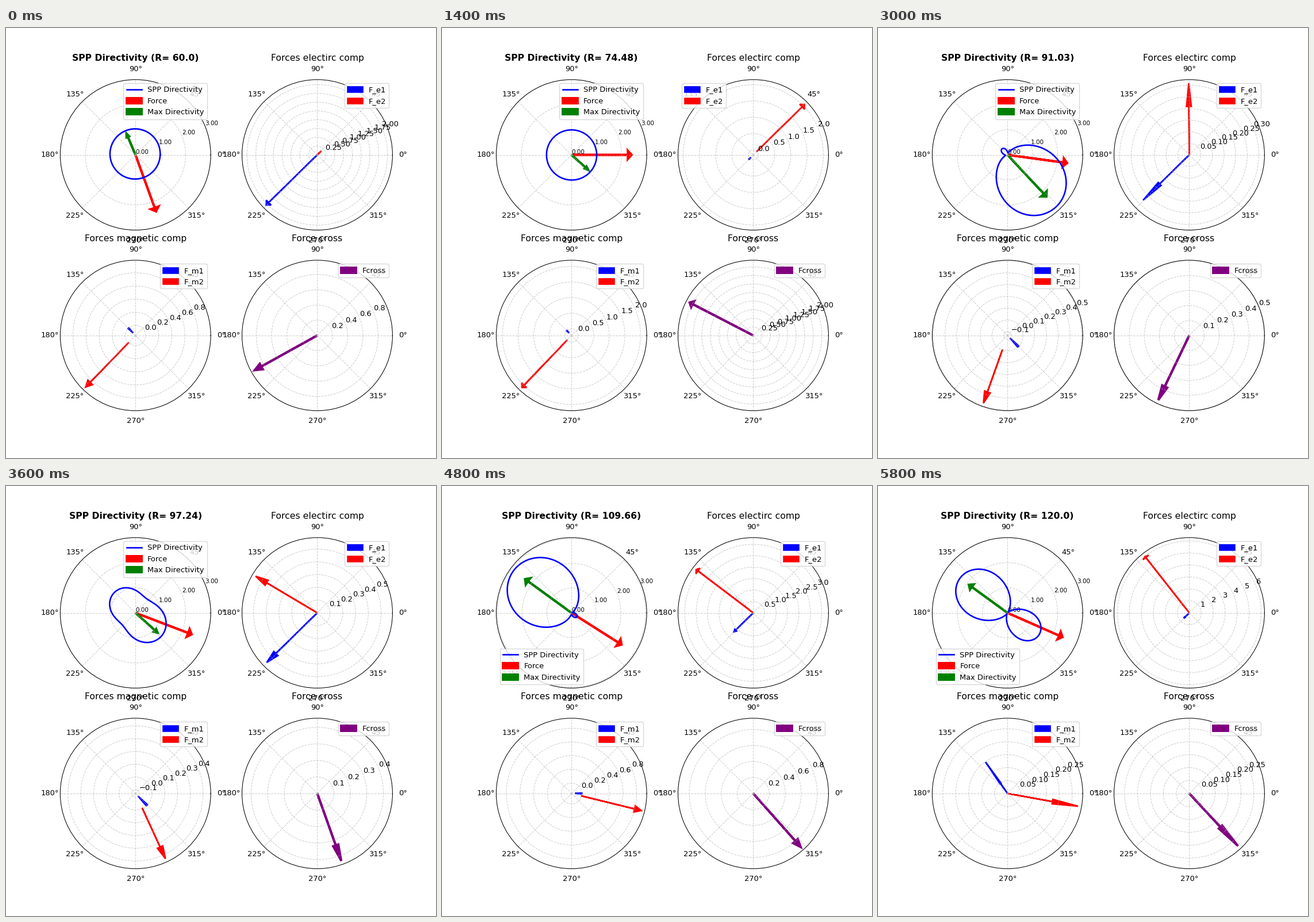
A matplotlib script that plays this animation: 748x748 px, repeating every 6000 ms.

```python
import numpy as np
import matplotlib.pyplot as plt
from matplotlib.animation import FuncAnimation

FRAMES = 30
N = np.arange(FRAMES)
RADII = np.linspace(60, 120, FRAMES)
THETA = np.linspace(0, 2 * np.pi, 361)


def bump(center, width):
    return np.exp(-((N - center) / width) ** 2)


def rise(center, width):
    return 1 / (1 + np.exp(-(N - center) / width))


def ease(start, end):
    t = np.clip((N - start) / (end - start), 0, 1)
    return t * t * (3 - 2 * t)


# Radiation pattern: dipole and quadrupole parts about a slowly tilting axis
dipole = (.01 - .05 * bump(0, 3) - .17 * bump(11, 2)
          + 1.25 * bump(15, 2) - 1.43 * bump(25, 3.6))
quadrupole = .58 * bump(15, 3.4) + .95 * rise(23.4, 1.27)
tilt = -42 - 25 * bump(0, 3) - 5 * bump(15, 2) + 6 * ease(18, 24)
swing = 49 * bump(21, 1.5)
force_deg = 12 - 46 * rise(15.7, 2.5) - 82 * bump(0, 4.9) + 10 * ease(24, 29)

# Electric forces: the first one reverses twice along a fixed line
e1 = (1 - N / 7) * (1 - N / 12.7) * (.48 + 1.46 * bump(0, 13) - .355 * ease(23, 29))
e1_deg = 224.5 + 180 * (e1 < 0)
e2 = 1.98 * bump(7.53, 4.03) + 6.9 * rise(24.6, 2.5)
e2_deg = 44.5 + 110 * rise(15.3, .9) - 27 * ease(19, 30)

# Magnetic forces; the cross term has the size of the second one
m1 = -.002 + .0495 * ease(24, 29)
m1_deg = -46 + 177 * ease(21, 30) + 180 * (N < 13)
m2 = (.33 - .154 * ease(24, 29) + 1.804 * bump(5.57, 4.957)
      + .467 * bump(24, 2.02))
m2_deg = 226 + 124 * rise(17.6, 1.85)
cross_deg = 209 + 104 * rise(15.5, 2) - 126 * bump(9.86, 3.24)

fig, axes = plt.subplots(2, 2, figsize=(8, 8), dpi=93.5,
                         subplot_kw={"projection": "polar"})
ax_dir, ax_el, ax_mag, ax_cross = axes.flat


def arrow(ax, deg, size, color, label, lw=2, head=.1):
    # The tiny offsets keep the tail inside the plot and the heading defined.
    ax.arrow(np.radians(deg), 1e-7, 1e-6, size, head_width=head,
             head_length=head, lw=lw, color=color, label=label)


def finish(ax, title, **style):
    ax.set_title(title, **style)
    ax.grid(True, linestyle="--", alpha=.6)
    ax.legend(loc="best")


def draw_directivity(ax, i):
    axis = np.radians(tilt[i])
    d = (1 + dipole[i] * np.cos(THETA - axis - np.radians(swing[i]))
         + quadrupole[i] * np.cos(2 * (THETA - axis)))
    d = np.maximum(d, 0)
    top = d.argmax()
    ax.plot(THETA, d, color="blue", lw=2, label="SPP Directivity")
    arrow(ax, force_deg[i], 2.25, "red", "Force", 3, .15)
    arrow(ax, np.degrees(THETA[top]), .75 * d[top], "green", "Max Directivity", 3, .15)
    ax.set_rticks([0, 1, 2, 3])
    ax.set_rlim(0, max(3, 1.05 * d[top]))
    ax.yaxis.set_major_formatter("{x:.2f}")
    ax.tick_params(axis="y", labelsize=8)
    finish(ax, f"SPP Directivity (R= {round(RADII[i], 2)})", fontweight="bold")


def draw(i):
    for ax in axes.flat:
        ax.clear()
    draw_directivity(ax_dir, i)

    arrow(ax_el, e1_deg[i], abs(e1[i]), "blue", "F_e1")
    arrow(ax_el, e2_deg[i], e2[i], "red", "F_e2")
    finish(ax_el, "Forces electirc comp")

    arrow(ax_mag, m1_deg[i], m1[i], "blue", "F_m1")
    arrow(ax_mag, m2_deg[i], m2[i], "red", "F_m2")
    finish(ax_mag, "Forces magnetic comp")

    arrow(ax_cross, cross_deg[i], m2[i], "purple", "Fcross", 3)
    finish(ax_cross, "Force cross")
    return []


anim = FuncAnimation(fig, draw, frames=FRAMES, interval=200, repeat=True,
                     repeat_delay=0, blit=False)
plt.show()
```
